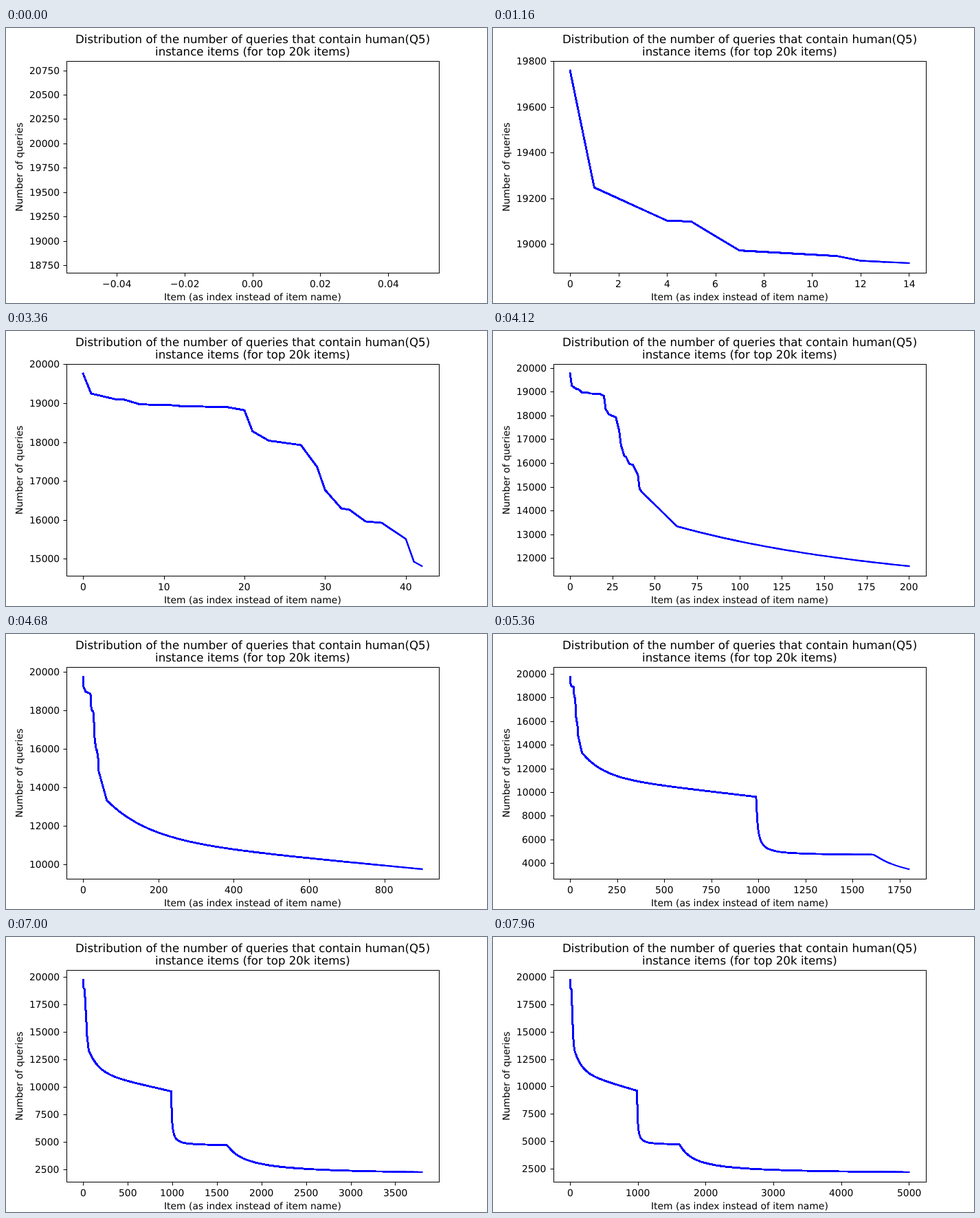
Recreate the animation shown at these times as an HTML page with a canvas. Size 700 px wide and 400 px high, loop 8000 ms.

```html
<!DOCTYPE html>
<html lang="en">
<head>
<meta charset="utf-8">
<title>Query distribution</title>
<style>
  html, body { margin: 0; width: 100%; height: 100%; overflow: hidden; background: #fff; }
  canvas { display: block; }
</style>
</head>
<body>
<canvas id="chart" width="700" height="400"></canvas>
<script>
const ctx = document.getElementById('chart').getContext('2d');
const LOOP = 8000, STEP = 40;
const PT = 100 / 72;                       // pixels per point
const BOX = { left: 87.5, right: 630, top: 48, bottom: 356 };
const FONT = '"DejaVu Sans", sans-serif';

// Corners of the steep start, joined by straight lines.
const corners = [
  [0, 19759], [1, 19247], [4, 19102], [5, 19098], [7, 18971], [11, 18947],
  [12, 18926], [18, 18895], [20, 18817], [21, 18277], [23, 18038], [27, 17922],
  [29, 17361], [30, 16768], [32, 16297], [33, 16262], [35, 15962], [37, 15926],
  [40, 15510], [41, 14927], [42, 14812], [63, 13340]
];

function alongCorners(x) {
  const i = Math.max(1, corners.findIndex(corner => corner[0] >= x));
  const [x0, y0] = corners[i - 1], [x1, y1] = corners[i];
  return y0 + (y1 - y0) * (x - x0) / (x1 - x0);
}

// The long tail is the lowest of a fading slope and two hyperbolas.
function valueAt(x) {
  if (x <= 63) return alongCorners(x);
  const slope = 11432 - 1.853 * x + 2025 * Math.exp((63 - x) / 113);
  const plateau = x > 981 ? 4650 + 40000 / (x - 981) : Infinity;
  const end = x > 1393 ? 2000 + 606000 / (x - 1393) : Infinity;
  return Math.min(slope, plateau, end);
}

const samples = [];
for (let x = 0; x < 5000; x += x < 70 ? 1 : x < 1050 ? 3 : 20) samples.push([x, valueAt(x)]);

// Each state lasts two steps: first one item at a time, then 100 at a time.
function lastIndex(step) {
  const state = Math.floor(step / 2);
  return state < 50 ? state : (state - 49) * 100;
}

function limits(lo, hi) {
  if (lo === hi) {
    const spread = 0.05 * (Math.abs(lo) || 1);
    lo -= spread;
    hi += spread;
  }
  const margin = 0.05 * (hi - lo);
  return [lo - margin, hi + margin];
}

function ticks([lo, hi]) {
  const raw = (hi - lo) / 9;
  const scale = 10 ** Math.floor(Math.log10(raw));
  const step = scale * [1, 2, 2.5, 5, 10].find(s => s * scale >= raw - 1e-9);
  let digits = 0;
  while (Math.abs(step * 10 ** digits - Math.round(step * 10 ** digits)) > 1e-6) digits++;
  const list = [];
  for (let i = Math.ceil(lo / step); i <= Math.floor(hi / step); i++) {
    list.push({ value: i * step, label: (i * step).toFixed(digits).replace('-', '\u2212') });
  }
  return list;
}

// Text starts on a whole pixel; align is the share of its width left of x.
function text(string, x, y, points = 10, align = 0.5) {
  ctx.font = `${points * PT}px ${FONT}`;
  ctx.textRendering = 'geometricPrecision';
  ctx.fillText(string, Math.round(x - align * ctx.measureText(string).width), y);
}

function line(x0, y0, x1, y1) {
  ctx.beginPath();
  ctx.moveTo(x0, y0);
  ctx.lineTo(x1, y1);
  ctx.stroke();
}

function drawCurves(step, toX, toY) {
  const path = samples.map(([x, y]) => [x, toX(x), toY(y)]);
  ctx.save();
  ctx.beginPath();
  ctx.rect(BOX.left, BOX.top, BOX.right - BOX.left, BOX.bottom - BOX.top);
  ctx.clip();
  ctx.strokeStyle = '#00f';
  ctx.lineWidth = 1.5 * PT;
  ctx.lineJoin = 'round';
  ctx.lineCap = 'square';
  // Every step adds one more line over the earlier ones.
  for (let pass = 2; pass <= step; pass++) {
    const end = lastIndex(pass);
    ctx.beginPath();
    for (const [index, x, y] of path) {
      if (index >= end) break;
      ctx.lineTo(x, y);
    }
    ctx.lineTo(toX(end), toY(valueAt(end)));
    ctx.stroke();
  }
  ctx.restore();
}

function drawAxes(xLimits, yLimits, toX, toY) {
  ctx.strokeStyle = ctx.fillStyle = '#000';
  ctx.lineWidth = 1;
  ctx.strokeRect(88.5, 48.5, 542, 308);
  for (const { value, label } of ticks(xLimits)) {
    const x = Math.round(toX(value)) + 0.5;
    line(x, 356.5, x, 361.5);
    text(label, toX(value), 377);
  }
  for (const { value, label } of ticks(yLimits)) {
    const y = Math.round(toY(value));
    line(83.5, y + 0.5, 88.5, y + 0.5);
    text(label, 77.8, y + 5, 10, 1);
  }
  const middle = (BOX.left + BOX.right) / 2;
  text('Distribution of the number of queries that contain human(Q5)', middle, 22, 12);
  text('instance items (for top 20k items)', middle, 40, 12);
  text('Item (as index instead of item name)', middle, 396);
  ctx.save();
  ctx.translate(24, 202);
  ctx.rotate(-Math.PI / 2);
  text('Number of queries', 0, 0);
  ctx.restore();
}

function draw(step) {
  const end = lastIndex(step);
  const xLimits = limits(0, end);
  const yLimits = limits(valueAt(end), valueAt(0));
  const scaler = ([lo, hi], from, to) => v => from + (to - from) * (v - lo) / (hi - lo);
  const toX = scaler(xLimits, BOX.left, BOX.right);
  const toY = scaler(yLimits, BOX.bottom, BOX.top);
  ctx.fillStyle = '#fff';
  ctx.fillRect(0, 0, 700, 400);
  drawCurves(step, toX, toY);
  drawAxes(xLimits, yLimits, toX, toY);
}

let shown = -1;
const start = performance.now();
function tick() {
  const step = Math.floor((performance.now() - start) % LOOP / STEP);
  if (step !== shown) draw(shown = step);
  requestAnimationFrame(tick);
}
tick();
</script>
</body>
</html>
```
